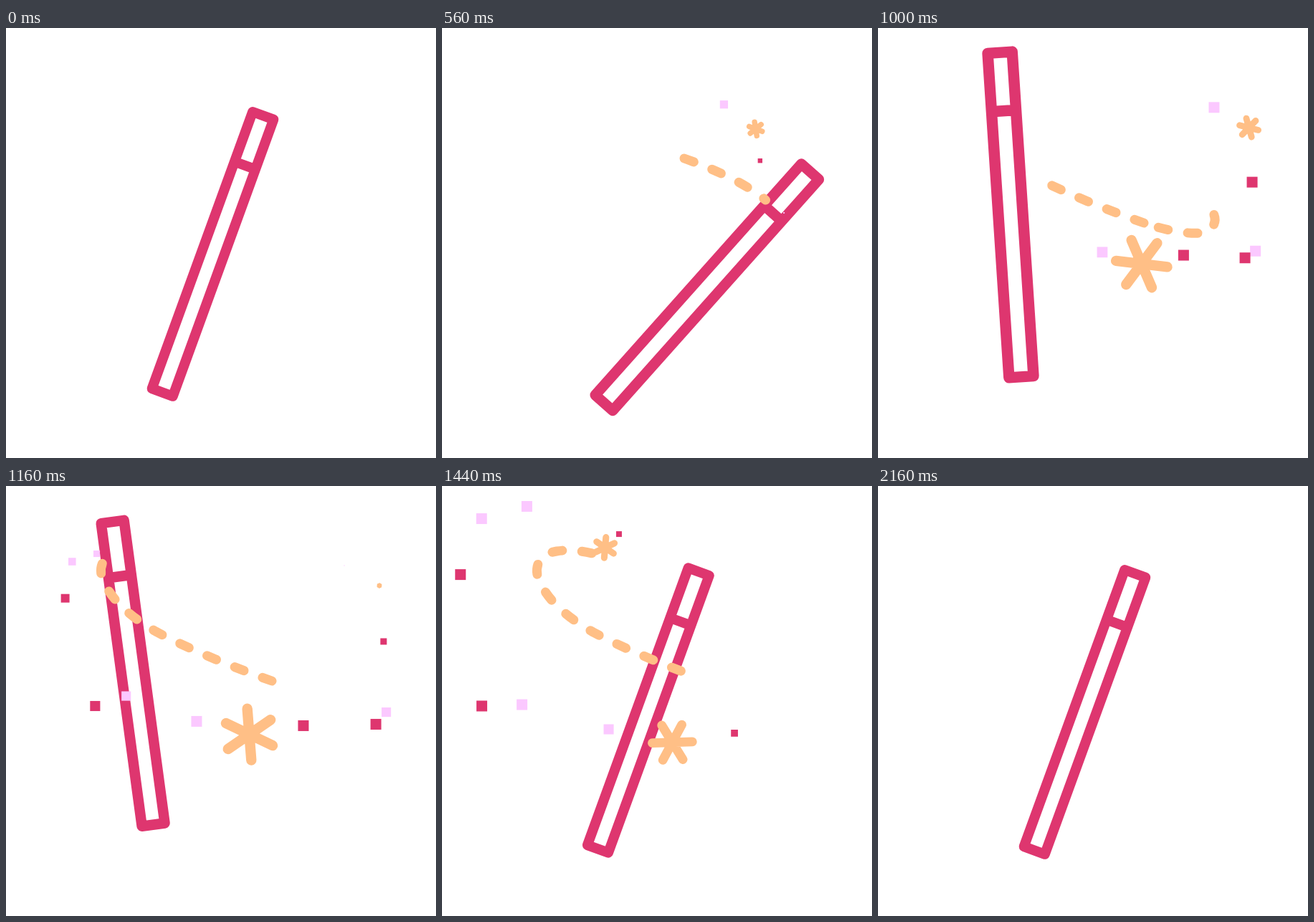
Write an HTML page with a canvas that moves like this. It is 600x600 px and loops after 2.2 s.

```html
<!DOCTYPE html>
<html>
<head>
<meta charset="utf-8">
<title>Magic wand</title>
<style>
html, body { margin: 0; width: 100%; height: 100%; overflow: hidden; background: #fff; }
canvas { display: block; }
</style>
</head>
<body>
<canvas id="stage" width="600" height="600"></canvas>
<script>
const ctx = document.getElementById('stage').getContext('2d');
const LOOP = 2200, STEP = 40, LIFE = 740;
const PINK = '#de366f', PALE = '#fbc8ff', ORANGE = '#ffbf86';

const clamp = u => Math.min(Math.max(u, 0), 1);
const smooth = u => u * u * (3 - 2 * u);
const progress = (t, start, span) => clamp((t - start) / span);
const mix = (a, b, k) => a + (b - a) * k;
const rad = degrees => degrees * Math.PI / 180;

// The wand leans back, swings right, then left, then returns
const swing = [[0, 20], [240, 15], [580, 42], [1110, -9.5], [1440, 20]];
const foot = [[240, 218.2, 508.5], [560, 226, 523], [840, 185.5, 552.5], [1070, 204, 468], [1500, 218.2, 508.5]];

// Each trail grows along its path, then its tail catches up
const trails = [
  {
    path: new Path2D('M338 182C388 200 433 222 457 245C472 259 474 270 464 281C456 289 428 288 390 278'),
    length: 256, start: 400, grow: 320, leave: 560, shrink: 520
  },
  {
    path: new Path2D('M371 272C320 254 258 229 211 204C175 184 145 158 134 128C128 108 140 94 160 91C180 88 200 91 222 97'),
    length: 415, start: 770, grow: 580, leave: 1160, shrink: 610
  }
];

// Bursts of squares at even gaps, each flying from one point to another
const bursts = [
  { start: 425, gap: 45, flights: [
    [PALE, 342, 104, 472, 111], [PINK, 412, 173, 527, 217], [PALE, 468, 248, 531, 316]] },
  { start: 698, gap: 58, flights: [
    [PINK, 496, 274, 518, 338], [PINK, 458, 269, 408, 345], [PALE, 400, 284, 231, 340]] },
  { start: 990, gap: 14, flights: [
    [PINK, 202, 307, 40, 307], [PALE, 224, 281, 98, 308], [PINK, 133, 186, 11, 115],
    [PALE, 121, 152, 45, 29], [PALE, 132, 139, 116, 9]] },
  { start: 1336, gap: 86, flights: [
    [PINK, 206, 63, 336, 76], [PALE, 327, 129, 485, 146]] }
];

const stars = [
  { birth: 430, life: 740, arm: 13.5, turn: 5, flight: [386, 142, 521, 139] },
  { birth: 745, life: 770, arm: 36, turn: 37, flight: [449, 279, 321, 358] },
  { birth: 1310, life: 740, arm: 20, turn: 19, flight: [177, 84, 309, 89] }
];

// Eased values between key points
function tween(keys, t) {
  const next = keys.findIndex(k => k[0] > t);
  if (next <= 0) return keys[next ? keys.length - 1 : 0].slice(1);
  const a = keys[next - 1], b = keys[next];
  const k = smooth(progress(t, a[0], b[0] - a[0]));
  return a.slice(1).map((v, i) => mix(v, b[i + 1], k));
}

// Sparks pop up quickly and shrink at the end of their life
const sparkSize = (age, life) =>
  smooth(clamp(age / 200)) * (1 - progress(age, life - 190, 190) ** 3);

function sparkPlace([x0, y0, x1, y1], u) {
  const k = 1 - (1 - u) ** 2.5;
  return [mix(x0, x1, k), mix(y0, y1, k)];
}

function drawWand(t) {
  const scale = 1 + 0.145 * Math.exp(-(((t - 840) / 275) ** 2));
  ctx.save();
  ctx.translate(...tween(foot, t));
  ctx.rotate(rad(tween(swing, t)[0]));
  ctx.scale(scale, scale);
  ctx.strokeStyle = PINK;
  ctx.lineWidth = 14;
  ctx.beginPath();
  ctx.rect(-15.5, -411, 31, 411);
  ctx.moveTo(-15.5, -337);
  ctx.lineTo(15.5, -337);
  ctx.stroke();
  ctx.restore();
}

function drawTrail({ path, length, start, grow, leave, shrink }, t) {
  const head = length * smooth(progress(t, start, grow));
  const tail = length * progress(t, leave, shrink) ** 3;
  const dash = 14, gap = 27.5, pattern = [];
  for (let s = tail; s < head; s += dash + gap) pattern.push(Math.min(dash, head - s), gap);
  if (!pattern.length) return;
  pattern[pattern.length - 1] = 9999;
  ctx.save();
  ctx.strokeStyle = ORANGE;
  ctx.lineWidth = 13;
  ctx.setLineDash(pattern);
  ctx.lineDashOffset = -tail;
  ctx.stroke(path);
  ctx.restore();
}

function drawBurst({ start, gap, flights }, t) {
  flights.forEach(([color, ...flight], i) => {
    const age = t - start - i * gap;
    if (age <= 0 || age >= LIFE) return;
    const [x, y] = sparkPlace(flight, age / LIFE), side = 15 * sparkSize(age, LIFE);
    ctx.fillStyle = color;
    ctx.fillRect(x - side / 2, y - side / 2, side, side);
  });
}

function drawStar({ birth, life, arm, turn, flight }, t) {
  const age = t - birth, u = age / life;
  if (u <= 0 || u >= 1) return;
  const r = arm * sparkSize(age, life);
  ctx.save();
  ctx.translate(...sparkPlace(flight, u));
  ctx.rotate(rad(turn + 90 * u));
  ctx.strokeStyle = ORANGE;
  ctx.lineWidth = 2.4 * Math.sqrt(r);
  ctx.beginPath();
  for (let i = 0; i < 3; i++) {
    ctx.moveTo(-r, 0);
    ctx.lineTo(r, 0);
    ctx.rotate(Math.PI / 3);
  }
  ctx.stroke();
  ctx.restore();
}

const begin = performance.now();

function frame() {
  const t = Math.floor((performance.now() - begin) % LOOP / STEP) * STEP;
  ctx.fillStyle = '#fff';
  ctx.fillRect(0, 0, 600, 600);
  ctx.lineCap = ctx.lineJoin = 'round';
  drawWand(t);
  trails.forEach(trail => drawTrail(trail, t));
  bursts.forEach(burst => drawBurst(burst, t));
  stars.forEach(star => drawStar(star, t));
  requestAnimationFrame(frame);
}
frame();
</script>
</body>
</html>
```
